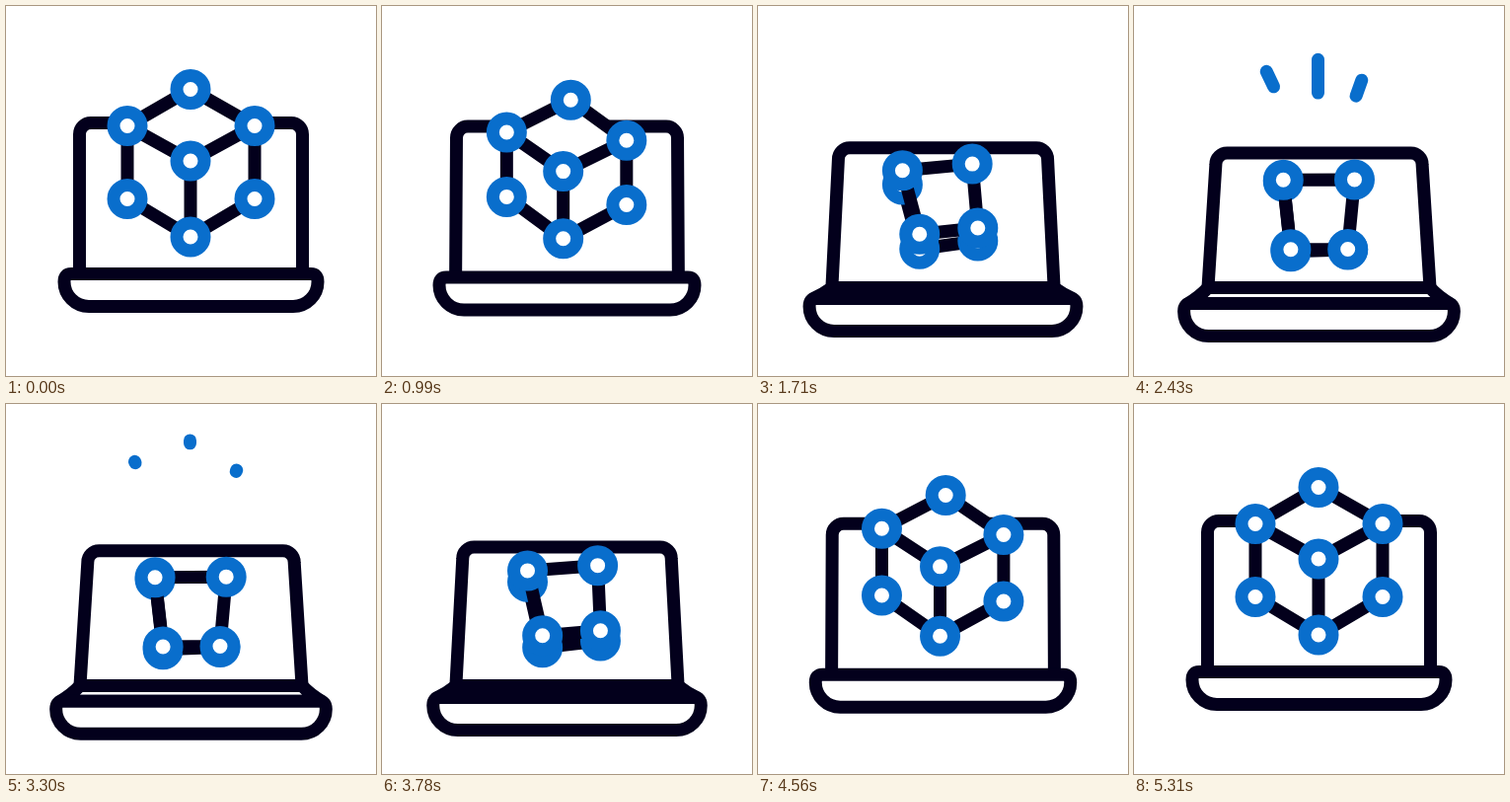
An HTML page that plays this animation: 375x375 px, repeating every 5400 ms.

```html
<!DOCTYPE html>
<html lang="en">
<head>
<meta charset="utf-8">
<title>Laptop and cube</title>
<style>
  html, body { margin: 0; width: 100%; height: 100%; overflow: hidden; background: #fff; }
  svg { display: block; width: 100%; height: 100%; }
  path { fill: none; stroke-width: 13; stroke-linejoin: round; }
  .ink { stroke: #03001c; }
  .solid { fill: #fff; }
  .ray { stroke: #096ecc; stroke-linecap: round; }
  circle { fill: #fff; stroke: #096ecc; stroke-width: 13; }
</style>
</head>
<body>
<svg viewBox="0 0 375 375">
  <path id="screen" class="ink"/>
  <path id="deck" class="ink solid"/>
  <path id="base" class="ink solid"/>
  <path id="faces" class="solid"/>
  <path id="lowEdges" class="ink"/>
  <g id="lowNodes"></g>
  <path id="topEdges" class="ink"/>
  <g id="topNodes"></g>
  <g id="rays"></g>
</svg>
<script>
const LOOP = 5400, STEP = 30, LAST = 5310;
const HINGE = 285.5, MID = 187.5;

// Each corner: upright position, tilted position
const corners = {
  A: [[187, 84.5], [224, 177.2]],
  B: [[123, 121.5], [151.7, 177]],
  C: [[252, 121.5], [216.2, 248.3]],
  D: [[187, 157], [158.5, 248]],
  E: [[123, 195.5], [151.7, 177.7]],
  F: [[252, 195.5], [216.2, 247.6]],
  G: [[187, 234], [158.5, 249]]
};
// Each ray: inner end, outer end
const rays = [
  [[142, 82.7], [130.4, 58.2]],
  [[186.5, 90], [186.5, 36.5]],
  [[224.8, 92], [233.8, 66.8]]
];

const el = id => document.getElementById(id);
const lerp = (a, b, k) => a + (b - a) * k;
const mix = (a, b, k) => [lerp(a[0], b[0], k), lerp(a[1], b[1], k)];
const span = (t, a, b) => Math.min(1, Math.max(0, (t - a) / (b - a)));
const draw = (id, d) => el(id).setAttribute('d', d);

function add(parent, tag, cls) {
  const node = document.createElementNS('http://www.w3.org/2000/svg', tag);
  if (cls) node.setAttribute('class', cls);
  return el(parent).appendChild(node);
}

const nodes = {};
for (const key of 'EFGABCD') {
  nodes[key] = add('EFG'.includes(key) ? 'lowNodes' : 'topNodes', 'circle');
  nodes[key].setAttribute('r', 14);
}
const rayPaths = rays.map(() => add('rays', 'path', 'ray'));

// cubic-bezier(.8, 0, .2, 1)
function ease(x) {
  let lo = 0, hi = 1;
  for (let i = 0; i < 24; i++) {
    const s = (lo + hi) / 2, r = 1 - s;
    if (2.4 * s * r * r + 0.6 * s * s * r + s * s * s < x) lo = s; else hi = s;
  }
  return lo * lo * (3 - 2 * lo);
}
const cubicOut = u => 1 - (1 - u) ** 3;
const cubicInOut = u => u < 0.5 ? 4 * u ** 3 : 1 - 4 * (1 - u) ** 3;

function drawLaptop(p) {
  const flip = x => 2 * MID - x;
  const foot = lerp(74.5, 75, p), side = lerp(74.5, 83, p);
  const top = lerp(118.5, 149.5, p), bend = side + 11.5, sideY = top + 11.5;
  draw('screen', `M${foot} ${HINGE}L${side} ${sideY}A11.5 11.5 0 0 1 ${bend} ${top}` +
    `H${flip(bend)}A11.5 11.5 0 0 1 ${flip(side)} ${sideY}L${flip(foot)} ${HINGE}Z`);

  const left = lerp(59, 50.5, p), right = flip(left);
  const y = lerp(271.5, 302, p), bottom = y + 33;
  const front = Math.max(y, HINGE), curveY = lerp(HINGE, front, 0.6);
  draw('deck', `M75 ${HINGE}H300Q${flip(66)} ${curveY} ${right - 4} ${front}` +
    `H${left + 4}Q66 ${curveY} 75 ${HINGE}Z`);
  draw('base', `M${left + 7} ${y}H${right - 7}Q${right} ${y} ${right} ${y + 8}` +
    `A25 25 0 0 1 ${right - 25} ${bottom}H${left + 25}` +
    `A25 25 0 0 1 ${left} ${y + 8}Q${left} ${y} ${left + 7} ${y}Z`);
}

function drawCube(p) {
  const at = {};
  for (const key in corners) {
    const [x, y] = at[key] = mix(...corners[key], p);
    nodes[key].setAttribute('cx', x);
    nodes[key].setAttribute('cy', y);
  }
  const lines = names => names.split(' ').map(n => 'M' + [...n].map(k => at[k]).join('L')).join('');
  draw('faces', lines('ABDC BDGE DCFG'));
  draw('lowEdges', lines('BE CF DG EG FG'));
  draw('topEdges', lines('AB AC BD CD'));
}

function drawRays(t) {
  const head = cubicOut(span(t, 1889, 3650));
  const tail = cubicInOut(span(t, 2100, 3700));
  rays.forEach(([inner, outer], i) => {
    const shown = head > 0 && tail < 1;
    rayPaths[i].setAttribute('d', shown ? `M${mix(inner, outer, tail)}L${mix(inner, outer, head)}` : '');
  });
}

function render(now) {
  const t = Math.min(LAST, Math.floor((now % LOOP) / STEP) * STEP);
  const p = ease(span(t, 0, 2850)) - ease(span(t, 2850, 5340));
  drawLaptop(p);
  drawCube(p);
  drawRays(t);
}

let start;
function tick(now) {
  start ??= now;
  render(now - start);
  requestAnimationFrame(tick);
}
render(0);
requestAnimationFrame(tick);
</script>
</body>
</html>
```
